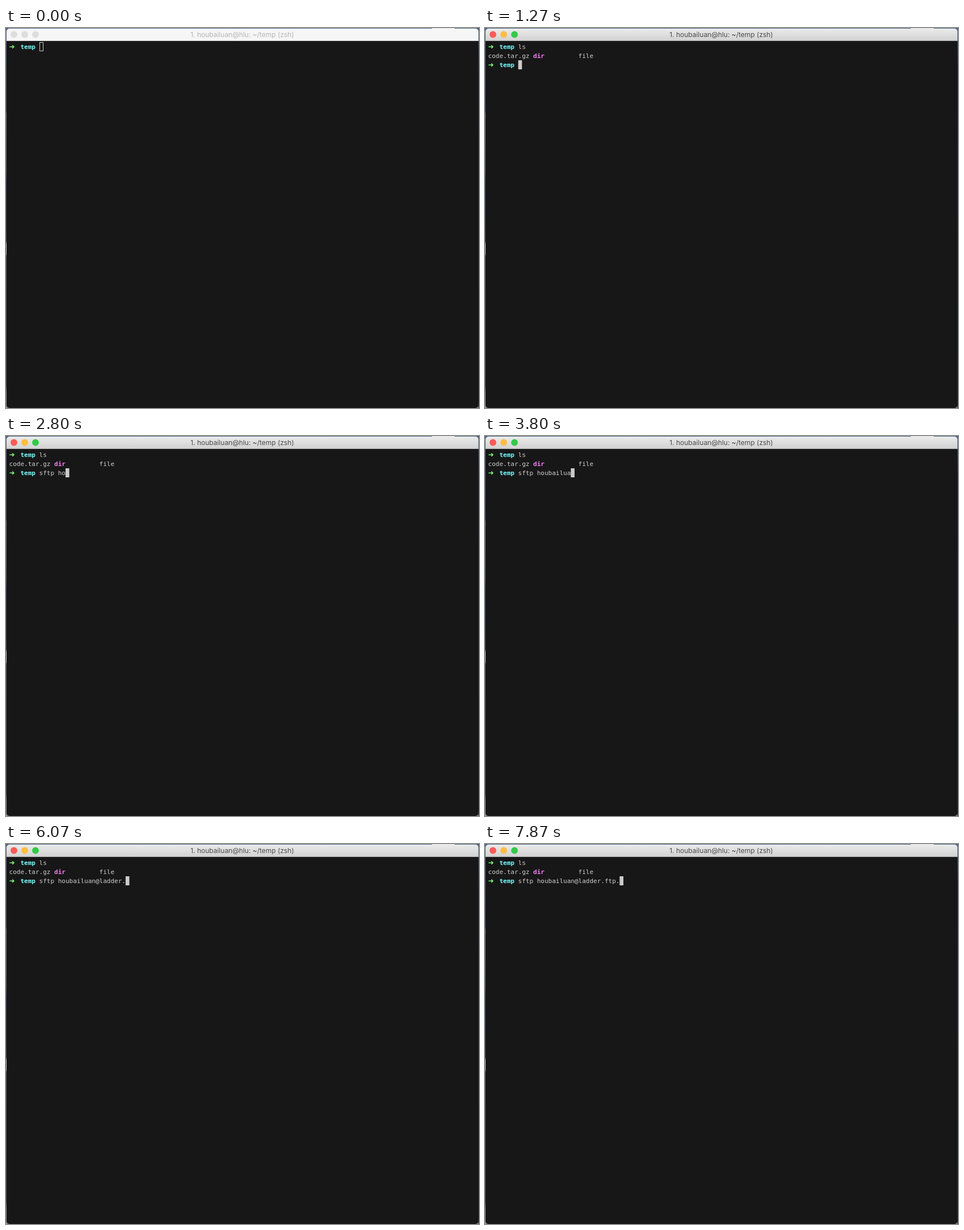
These frames come from a looping animation (834x671 px, 8000 ms). An HTML page with a canvas:

```html
<!DOCTYPE html>
<html lang="en">
<head>
<meta charset="utf-8">
<title>Terminal session</title>
<style>
  html, body { margin: 0; width: 100%; height: 100%; overflow: hidden; background: #171717; }
  canvas { display: block; width: 834px; height: 671px; }
</style>
</head>
<body>
<canvas id="stage" width="834" height="671"></canvas>
<script>
const ctx = document.getElementById('stage').getContext('2d');
const W = 834, H = 671, LOOP = 8000;
const FOCUS = 470, ENTER = 1270;
const MONO = '"DejaVu Sans Mono", monospace';
const LEFT = 5.6, CELL = 6.622, TOP = 25, ROW = 16, INPUT_COL = 8;
const COLOR = {
  body: '#171717', text: '#cfcfcf', arrow: '#80fb82',
  path: '#78fafb', dir: '#f582f2', cursor: '#cbcbcb'
};

// Key presses by time; '<' is backspace.
const typeKeys = (text, times) => times.map((at, i) => ({ at, key: text[i] }));
const listKeys = typeKeys('ls', [930, 1070]);
const sftpKeys = [
  ...typeKeys('sftp ', [1470, 1670, 1870, 2070, 2270]),
  ...typeKeys('houbailuan', [2470, 2670, 2870, 3070, 3200, 3330, 3470, 3600, 3800, 4000]),
  ...typeKeys('@ladder.', [4400, 4930, 5070, 5330, 5470, 5600, 5800, 6000]),
  ...typeKeys('fpt<<tp.', [6330, 6530, 7000, 7270, 7400, 7530, 7670, 7870])
];

function typed(keys, t) {
  let line = '';
  for (const { at, key } of keys) {
    if (at > t) break;
    line = key === '<' ? line.slice(0, -1) : line + key;
  }
  return line;
}

function rect(x, y, w, h, fill) {
  ctx.fillStyle = fill;
  ctx.fillRect(x, y, w, h);
}

function gradient(y0, y1, stops) {
  const g = ctx.createLinearGradient(0, y0, 0, y1);
  stops.forEach(([p, c]) => g.addColorStop(p, c));
  return g;
}

function print(text, col, row, color, weight = 'normal') {
  ctx.font = `${weight} 11px ${MONO}`;
  ctx.textAlign = 'left';
  ctx.fillStyle = color;
  [...text].forEach((ch, i) => {
    if (ch !== ' ') ctx.fillText(ch, LEFT + (col + i) * CELL, TOP + row * ROW + 12);
  });
}

function prompt(row, input) {
  ctx.font = 'bold 12px "DejaVu Sans", sans-serif';
  ctx.textAlign = 'left';
  ctx.fillStyle = COLOR.arrow;
  ctx.fillText('➜', LEFT, TOP + row * ROW + 12);
  print('temp', 3, row, COLOR.path, 'bold');
  print(input, INPUT_COL, row, COLOR.text);
}

function cursor(col, row, solid) {
  const x = LEFT + col * CELL, y = TOP + row * ROW;
  if (solid) {
    rect(x, y, CELL, ROW, COLOR.cursor);
  } else {
    ctx.strokeStyle = COLOR.cursor;
    ctx.lineWidth = 1;
    ctx.strokeRect(Math.round(x) + 0.5, y + 0.5, 6, ROW - 1);
  }
}

function desktop() {
  rect(0, 0, W, H, gradient(0, H, [
    [0, '#4a6784'], [0.22, '#3d5570'], [0.225, '#8a8a8a'], [0.25, '#777777'],
    [0.38, '#5a6470'], [0.4, '#2f4a6b'], [0.56, '#3c4a5a'], [0.57, '#d0d0d0'],
    [0.595, '#c0c0c0'], [0.6, '#606060'], [0.94, '#555555'], [0.96, '#9a9a9a'], [1, '#909090']
  ]));
  rect(W - 1, 0, 1, H, gradient(0, H, [[0, '#4a6784'], [0.1, '#26384c'], [1, '#252b34']]));
  rect(751, 0, 40, 1, '#e4e4e4');
}

function titleBar(active) {
  rect(1, 1, W - 2, 21, active
    ? gradient(1, 22, [[0, '#ebebeb'], [1, '#d2d2d2']])
    : '#f6f6f6');
  rect(1, 22, W - 2, 1, active ? '#a9a9a9' : '#cfcfcf');

  const lights = active ? ['#fc5b57', '#fdbd41', '#35c94b'] : ['#dddddd', '#dddddd', '#dddddd'];
  lights.forEach((color, i) => {
    ctx.beginPath();
    ctx.arc(14 + 19 * i, 11.5, 5.9, 0, Math.PI * 2);
    ctx.fillStyle = color;
    ctx.fill();
  });

  ctx.font = '12px Inter, sans-serif';
  ctx.textAlign = 'center';
  ctx.fillStyle = active ? '#4a4a4a' : '#b4b4b4';
  ctx.fillText('1. houbailuan@hlu: ~/temp (zsh)', 416.5, 16);
}

function draw(t) {
  const active = t >= FOCUS;
  desktop();
  ctx.save();
  ctx.beginPath();
  ctx.roundRect(1, 1, W - 2, H - 1, 5);
  ctx.clip();
  rect(1, 1, W - 2, H - 1, COLOR.body);
  titleBar(active);

  const command = typed(listKeys, t);
  prompt(0, command);
  if (t < ENTER) {
    cursor(INPUT_COL + command.length, 0, active);
  } else {
    print('code.tar.gz', 0, 1, COLOR.text);
    print('dir', 12, 1, COLOR.dir, 'bold');
    print('file', 24, 1, COLOR.text);
    const input = typed(sftpKeys, t);
    prompt(2, input);
    cursor(INPUT_COL + input.length, 2, true);
  }
  ctx.restore();
}

const start = performance.now();
function tick() {
  draw((performance.now() - start) % LOOP);
  requestAnimationFrame(tick);
}
tick();
</script>
</body>
</html>
```
